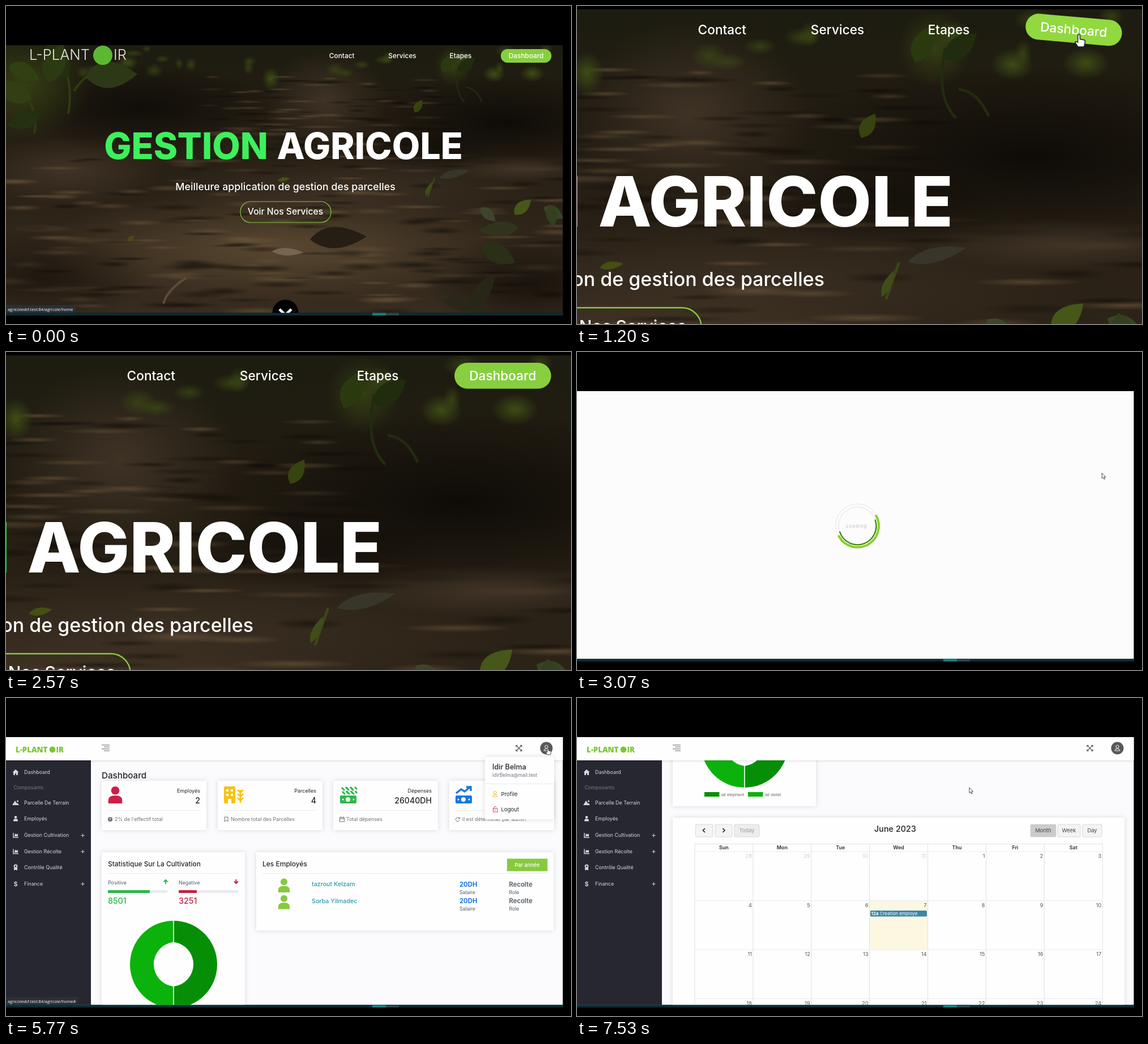
Recreate the animation shown at these times as an HTML page. Size 998 by 561 pixels, loop 7.56 s.

```html
<!DOCTYPE html>
<html lang="fr">
<head>
<meta charset="utf-8">
<title>Gestion agricole</title>
<style>
  html, body { margin: 0; width: 100%; height: 100%; overflow: hidden; background: #000; }
  svg { display: block; width: 100%; height: 100%; font-family: Inter, "Open Sans", sans-serif; }
  .card { fill: #fefefe; filter: drop-shadow(0 0 4px #0002); }
</style>
</head>
<body>
<svg id="stage" viewBox="0 0 998 561"></svg>
<script>
const LOOP = 7560, SCROLL = 389;
const GREEN = '#86ca3e', INK = '#222429', MUTED = '#6c727a';

// Markup helpers
const text = (x, y, s, size, fill = INK, weight = 400, more = '') =>
  `<text x="${x}" y="${y}" font-size="${size}" fill="${fill}" font-weight="${weight}" ${more}>${s}</text>`;
const END = 'text-anchor="end"', MID = 'text-anchor="middle"';
const rect = (x, y, w, h, fill, more = '') =>
  `<rect x="${x}" y="${y}" width="${w}" height="${h}" fill="${fill}" ${more}/>`;
const circle = (x, y, r, fill, more = '') => `<circle cx="${x}" cy="${y}" r="${r}" fill="${fill}" ${more}/>`;
const line = (d, stroke, width = 1, more = '') =>
  `<path d="${d}" fill="none" stroke="${stroke}" stroke-width="${width}" ${more}/>`;
const shape = (d, fill, more = '') => `<path d="${d}" fill="${fill}" ${more}/>`;
const at = (x, y, s, k = 1) => `<g transform="translate(${x} ${y}) scale(${k})">${s}</g>`;
const card = (x, y, w, h) => rect(x, y, w, h, '#fefefe', 'class="card"');
const rule = (x1, x2, y) => line(`M${x1} ${y}H${x2}`, '#e8eaed');

let seed = 11;
const rand = () => (seed = (seed * 16807) % 2147483647) / 2147483647;

// Field backdrop
function field() {
  const tones = { pale: '#6b563b', earth: '#46382a', dark: '#0d0a06', moss: '#3d4c14' };
  const defs = Object.entries(tones).map(([id, c]) =>
    `<radialGradient id="${id}"><stop stop-color="${c}"/><stop offset="1" stop-color="${c}" stop-opacity="0"/></radialGradient>`).join('');
  const blob = (id, x, y, rx, ry, o = 1) =>
    `<ellipse cx="${x}" cy="${y}" rx="${rx}" ry="${ry}" fill="url(#${id})" opacity="${o}"/>`;
  const leaf = (x, y, len, angle, fill, wide = .34) =>
    `<path transform="translate(${x} ${y}) rotate(${angle})" fill="${fill}" d="M0 0Q${len * .35} ${-len * wide * 1.6} ${len} 0Q${len * .4} ${len * wide * 1.4} 0 0"/>`;
  let out = `<defs>${defs}<linearGradient id="soil" x2="0" y2="1">
    <stop stop-color="#1d1c10"/><stop offset=".2" stop-color="#221c12"/>
    <stop offset=".55" stop-color="#2b2217"/><stop offset="1" stop-color="#382c1f"/></linearGradient></defs>`;
  out += rect(0, 69, 984, 473, 'url(#soil)');
  out += blob('earth', 565, 165, 110, 85, .8) + blob('pale', 480, 425, 420, 100, .7) + blob('earth', 600, 325, 330, 60, .6);
  out += blob('earth', 110, 290, 170, 60, .8);

  // Furrows: wide thin streaks that thicken towards the viewer
  for (let i = 0; i < 260; i++) {
    const d = rand(), y = 125 + d * 415, r = 9 + rand() * 20 + d * 14;
    const x = d < .35 ? 570 + (rand() - .5) * 440 : rand() * 984;
    out += blob(i % 2 ? 'dark' : 'pale', x, y, r * 1.7, 2.5 + d * 7 * rand(), .35 + .3 * rand());
  }
  out += blob('dark', 880, 205, 250, 85, .95) + blob('dark', 240, 180, 230, 80, .85) + blob('dark', 735, 250, 130, 36, .7);
  out += blob('dark', 930, 490, 190, 90, .7) + blob('dark', 60, 480, 200, 85, .55) + blob('earth', 905, 287, 130, 24, .8);

  for (let i = 0; i < 24; i++) out += blob('moss', rand() * 984, 74 + rand() * 45, 7 + rand() * 14, 6 + rand() * 10, .7);
  out += blob('moss', 790, 105, 34, 36, .7) + blob('moss', 862, 120, 20, 15) + blob('moss', 930, 119, 22, 15) + blob('moss', 468, 128, 16, 20);
  out += blob('moss', 30, 140, 120, 95, .7);
  out += line('M110 190Q120 130 95 95M50 225Q60 170 10 140M120 150Q140 120 160 118', '#303b10', 4);
  out += leaf(140, 125, 92, -3, '#2d3816') + leaf(110, 125, 75, -120, '#232f0f') + leaf(45, 165, 70, 205, '#313f12');
  out += leaf(75, 135, 75, -70, '#2b3a12') + leaf(60, 190, 62, 160, '#252f11') + leaf(5, 105, 60, 25, '#304111');
  out += line('M800 105Q790 150 810 170M812 143Q830 145 840 168', '#232b0f', 2.5);
  out += leaf(772, 118, 38, -65, '#2b390f') + leaf(800, 116, 38, -40, '#202c0d') + leaf(722, 188, 26, -60, '#37440f');
  out += line('M745 337L757 303', '#3c4618', 2.5) + leaf(765, 303, 56, -14, '#38362a', .16);
  out += leaf(741, 335, 27, -65, '#414d18', .18) + leaf(898, 368, 40, -42, '#465719') + leaf(838, 356, 36, 42, '#3f442a');
  out += leaf(905, 390, 70, 175, '#31341d', .25) + leaf(950, 355, 40, 30, '#384422') + leaf(960, 350, 40, 80, '#343e20');
  out += leaf(840, 425, 66, 25, '#2a2f18') + leaf(770, 520, 90, 8, '#29271a', .2) + leaf(820, 535, 75, -55, '#282717', .25);
  out += leaf(537, 412, 100, -3, '#261d14', .25) + leaf(480, 308, 22, -10, '#454f13', .22) + leaf(215, 415, 16, -40, '#4a4915');
  return out + leaf(470, 433, 56, 2, '#74664f', .16) + line('M278 525Q285 500 318 480', '#5c4c38', 4);
}

function hero() {
  const nav = [[593.2, 'Contact'], [700, 'Services'], [803, 'Etapes']]
    .map(([x, s]) => text(x, 92, s, 11.9, '#fff', 500, MID)).join('');
  return field() + text(41, 95, 'L-PLANT', 25.5, '#e9e8e4', 300) + circle(171, 87, 17, '#5cb832')
    + text(190, 95, 'IR', 25.5, '#e9e8e4', 300) + nav
    + `<g id="pill">${rect(874, 76, 89.5, 24, GREEN, 'id="pillBox" rx="12"')}${text(918.7, 92, 'Dashboard', 11.9, '#fff', 500, MID)}</g>`
    + text(463, 270, 'GESTION', 64.2, '#3df05c', 800, END) + text(478.5, 270, 'AGRICOLE', 64.2, '#fff', 800)
    + text(493.5, 325, 'Meilleure application de gestion des parcelles', 17.8, '#fff', 500, MID)
    + rect(414, 345, 160, 37, 'none', `rx="18" stroke="${GREEN}" stroke-width="1.2"`)
    + text(493.5, 368, 'Voir Nos Services', 15.7, '#fff', 500, MID)
    + circle(493.5, 541, 23, '#000') + line('M483 535L493.5 545L504 535', '#fff', 4.5);
}

function loader() {
  const arc = (id, r, color, w) => `<g id="${id}">${line(`M${r} 0A${r} ${r} 0 0 1 ${-r} 0`, color, w, 'stroke-linecap="round"')}</g>`;
  const ring = r => circle(0, 0, r, 'none', 'stroke="#e3e3e6" stroke-width="1"');
  return rect(0, 69, 984, 473, '#fcfcfd') + at(495.5, 307, ring(39) + ring(33.5) + arc('outer', 37.5, '#86d12a', 4) + arc('inner', 33, '#4c8a12', 2.4)
    + text(-20, 2.7, 'Loading<tspan opacity=".4">.</tspan>', 7.4, '#b9b9c2', 400, 'letter-spacing="1.3"'));
}

// Icons, each centred on its own origin
const person = c => circle(0, -5, 4.2, c) + shape('M-7 8V5Q-7 0 0 0T7 5V8Z', c);
const banknote = c => rect(-14, 1, 29, 14, c, 'rx="2"') + circle(0, 8, 4, '#fff') + circle(-9, 8, 1.5, '#fff') + circle(10, 8, 1.5, '#fff');
const sprig = c => [-11, -3, 5].map(x => line(`M${x} -13l5 5M${x + 1} -6l5 5M${x + 7} -14l4 4M${x + 8} -7l3 4`, c, 3)).join('');
const wheat = c => line('M0 14V-9M-5 -9l5 5l5 -5M-5 -2l5 5l5 -5M-5 5l5 5l5 -5', c, 2.6);
const building = c => rect(-18, -15, 20, 30, c, 'rx="2"')
  + [-14, -6].map(x => [-10, -2].map(y => rect(x, y, 4, 4, '#fff')).join('')).join('') + rect(-11, 7, 6, 8, '#fff') + at(11, 0, wheat(c));
const trend = c => line('M-13 -3L-4 -10L2 -6L12 -14M5 -14H13V-7', c, 3.4) + banknote(c);
const burger = line('M-7 -5H7M-3 -1.7H7M-7 1.7H7M-3 5H7', '#666', 1.1);
const expand = line('M-5 -5L5 5M5 -5L-5 5M-5 -2V-5H-2M2 -5H5V-2M5 2V5H2M-2 5H-5V2', '#555', 1.1);
const outlinePerson = c => circle(0, -2, 2.6, 'none', `stroke="${c}"`) + line('M-4.5 5Q-4 1.5 0 1.5T4.5 5Z', c);
const chart = c => line('M-4 -4V4H5', c, 1.5) + shape('M-2 2V0L0 -3L2 -1L4 -3V2Z', c);

function sidebar() {
  const c = '#d6d7dd';
  const items = [
    [131, 'Dashboard', shape('M-5.5 0L0 -5L5.5 0H4V5H1V2H-1V5H-4V0Z', c)],
    [185, 'Parcelle De Terrain', shape('M-6 4L-1 -4L2 1L3 0L6 4Z', c) + circle(3.5, -3, 1.5, c)],
    [213, 'Employés', at(0, 0, person(c), .55)],
    [242, 'Gestion Cultivation', chart(c), 1],
    [270.5, 'Gestion Récolte', chart(c), 1],
    [299, 'Contrôle Qualité', circle(0, -2, 2.4, 'none', `stroke="${c}" stroke-width="2"`) + shape('M-3 1L-3 5L0 4L3 5L3 1Z', c)],
    [327.5, 'Finance', text(0, 4, '$', 11, c, 600, MID), 1],
  ];
  return rect(0, 110, 150, 432, '#272732') + text(13.5, 161, 'Composants', 8.9, '#797a83')
    + items.map(([y, s, icon, more]) => at(17, y, icon) + text(32, y + 3.3, s, 8.9, c)
      + (more ? line(`M132.5 ${y + .5}h6M135.5 ${y - 2.5}v6`, c) : '')).join('');
}

function cards() {
  const list = [
    [169, 'Employés', '2', "2% de l'effectif total", at(24, 26, person('#cb1f47'), 1.75), circle(15, 68, 4, MUTED) + rect(14.4, 65.5, 1.2, 3.4, '#fff')],
    [374, 'Parcelles', '4', 'Nombre total des Parcelles', at(29, 25, building('#f7c313')), line('M12 64H18V72L15 69.5L12 72Z', MUTED)],
    [578, 'Dépenses', '26040DH', 'Total dépenses', at(26, 25, sprig('#2fb84c') + banknote('#2fb84c')), rect(11.5, 65, 8, 7, 'none', `stroke="${MUTED}"`) + line('M11 67H20M13.5 63v2M17.5 63v2', MUTED)],
    [783, '', '', 'il est déterminer par admin', at(25, 25, trend('#1877e0')), line('M18 66.5A3.5 3.5 0 1 0 18 70M18.5 64V67H15.5', MUTED)],
  ];
  return list.map(([x, label, value, note, icon, mark]) => at(x, 146, card(0, 0, 185, 87) + icon
    + text(174, 21, label, 9, INK, 400, END) + text(174, 40, value, 14.1, INK, 500, END)
    + rule(11, 174, 52.5) + mark + text(23, 71, note, 8.9, MUTED))).join('');
}

function stats() {
  const meter = (x, label, value, color, width, arrow) => text(x, 329, label, 8.9, '#555b63')
    + line(arrow, color, 2) + rect(x, 339, 105.5, 5, '#e9ebee', 'rx="1"') + rect(x, 339, width, 5, color, 'rx="1"') + text(x, 363, value, 14.3, color, 500);
  const half = (sweep, fill) => shape(`M296 393A77 77 0 0 ${sweep} 296 547V509A39.5 39.5 0 0 ${1 - sweep} 296 430.5Z`, fill);
  const legend = (x, s, fill) => rect(x, 555, 26.5, 8, fill) + text(x + 30, 562, s, 7.8, '#666', 400, 'font-family="Liberation Sans, sans-serif"');
  return card(169, 272, 253, 308) + text(180, 296.5, 'Statistique Sur La Cultivation', 11.9, INK, 500) + rule(180, 411, 309.5)
    + meter(180, 'Positive', '8501', '#2db84b', 74, 'M282 328V321M278.5 324.5L282 321L285.5 324.5')
    + meter(305, 'Negative', '3251', '#c91f45', 32, 'M406.5 320V327M403 323.5L406.5 327L410 323.5')
    + half(0, '#0bb20b') + half(1, '#068f06') + line('M296 393V431M296 509V547', '#fff', 1.6)
    + legend(225, 'ail elephant', '#068f06') + legend(302, 'ail violet', '#0bb20b');
}

function staff() {
  const row = (y, name) => at(491, y + .5, person(GREEN), 1.45) + text(540, y + 1, name, 10.7, '#2c98ab', 500)
    + text(801, y + 1.5, '20DH', 11.3, '#1877e0', 700) + text(801, y + 14.5, 'Salaire', 8.7, '#555b63')
    + text(888.5, y + 1.5, 'Recolte', 11.3, '#626972', 700) + text(888.5, y + 14.5, 'Role', 8.7, '#555b63');
  return card(442, 272, 525, 138) + text(453, 296.5, 'Les Employés', 12, INK, 500) + rule(453, 956, 309.5)
    + rect(885, 283.5, 71.5, 22, GREEN) + text(920.5, 297.5, 'Par année', 9.2, '#fff', 500, MID)
    + row(331, 'tazrout Kelzam') + row(360.5, 'Sorba Yilmadec');
}

function calendar() {
  const x0 = 208, y0 = 271, w = 102.9, h = 86.5, edge = '#dfe1e4';
  const button = (x, width, s, fill = '#f4f4f4', color = '#444') => rect(x, 223, width, 22, fill, 'rx="2" stroke="#d0d0d0" stroke-width=".8"')
    + text(x + width / 2, 237, s, 9.4, color, 400, MID);
  let out = card(169, 211, 798, 520) + button(209.5, 30.5, '') + button(244, 30, '') + line('M226 230L222.5 233.5L226 237M257.5 230L261 233.5L257.5 237', '#222', 1.7)
    + button(278, 44, 'Today', '#ededee', '#999') + text(562, 236, 'June 2023', 14.4, INK, 500, MID)
    + button(801, 45, 'Month', '#cbcbcc') + button(849, 40, 'Week') + button(893, 34, 'Day')
    + rect(x0 + 3 * w, y0 + h, w, h, '#fcf7e1');
  ['Sun', 'Mon', 'Tue', 'Wed', 'Thu', 'Fri', 'Sat'].forEach((s, i) => out += text(x0 + w * (i + .5), 267, s, 8.9, '#444', 700, MID));
  for (let i = 0; i < 28; i++) {
    const col = i % 7, row = Math.floor(i / 7), old = i < 4;
    out += text(x0 + w * (col + 1) - 2, y0 + row * h + 11, old ? 28 + i : i - 3, 9.2, old ? '#cfcfd2' : '#555', 400, END);
  }
  for (let i = 0; i < 8; i++) out += line(`M${x0 + i * w} 257V640`, edge);
  for (let i = 0; i < 5; i++) out += rule(x0, x0 + 7 * w, y0 + i * h);
  return out + line(`M${x0} 257.5H${x0 + 7 * w}`, edge) + rect(518, 375, 100, 10.5, '#3a87ad', 'rx="1.5"')
    + text(519.5, 383, '<tspan font-weight="700">12a</tspan> Creation employe', 8, '#fff');
}

function menu() {
  return card(846, 104, 122, 110) + text(859, 126, 'Idir Belma', 12.6, INK, 500) + text(859, 139, 'idirBelma@mail.test', 8.5, MUTED)
    + rule(846, 968, 151.5) + at(864, 169, outlinePerson('#efc02c')) + text(874.5, 173, 'Profile', 9.6)
    + rect(860.5, 195, 7.5, 6, 'none', 'stroke="#d63a78"') + line('M862 195V192.5Q864 190 866.5 192.5M864 197v2', '#d63a78') + text(874.5, 199.5, 'Logout', 9.6);
}

function dashboard() {
  return rect(0, 69, 984, 473, '#fbfbfd') + `<g id="content">${cards()}${text(169, 142, 'Dashboard', 15.2, INK, 500)}${stats()}${staff()}${at(0, SCROLL, calendar())}</g>`
    + sidebar() + rect(0, 69, 984, 41, '#fefefe', 'style="filter:drop-shadow(0 1px 2px #0002)"')
    + `<g font-family="Open Sans, sans-serif">${text(17, 95.5, 'L-PLANT', 13.2, '#79c72f', 800)}${text(88.5, 95.5, 'IR', 13.2, '#79c72f', 800)}</g>` + circle(82, 91, 5.4, '#79c72f')
    + at(176, 88, burger) + at(906, 88.5, expand) + circle(954.5, 88.5, 11, '#58585c') + at(954.5, 88, outlinePerson('#fff'))
    + `<g id="menu">${menu()}</g>`;
}

const arrow = shape('M0 0V9.5L2.2 7.6L3.8 11L5.3 10.3L3.8 7H6.6Z', '#fff', 'stroke="#23232b" stroke-width=".8"');
const hand = shape('M-1 .8Q0 -.8 1 .8V4.3L5 5.2Q6 5.6 5.7 7L4.8 11.5H-.8L-3.6 7.3Q-3.5 5.9 -1 7.3Z', '#fff', 'stroke="#23232b" stroke-width=".8"');

document.getElementById('stage').innerHTML = `<defs><clipPath id="page"><path d="M0 69H983.5V541.5H0Z"/></clipPath></defs>
  <g id="view"><g clip-path="url(#page)"><g id="hero">${hero()}</g><g id="loader">${loader()}</g><g id="dash">${dashboard()}</g>
  <g id="status" font-family="Open Sans, sans-serif">${rect(0, 528, 123, 14, '#2a3036', 'id="statusBox"')}<text id="url" x="3" y="537.5" font-size="7.4" fill="#fff"></text></g></g>
  ${rect(0, 541.5, 984, 4.5, '#0b2c34')}${rect(647, 541.5, 24, 4.5, '#128080')}${rect(671, 541.5, 23, 4.5, '#28474b')}
  <g id="cursor"><g id="arrow">${arrow}</g><g id="hand">${hand}</g></g></g>`;

const $ = Object.fromEntries([...document.querySelectorAll('g[id], #pillBox, #statusBox, #url')].map(e => [e.id, e]));
const set = (e, transform) => e.setAttribute('transform', transform);
const show = (e, on) => e.setAttribute('display', on ? 'inline' : 'none');
const ease = (t, from, to) => { const p = Math.min(1, Math.max(0, (t - from) / (to - from))); return p * p * (3 - 2 * p); };
const track = (keys, t, i) => keys.reduce((v, k, n) => n ? v + (k[i] - keys[n - 1][i]) * ease(t, keys[n - 1][0], k[0]) : k[i], 0);

const SWING = [[600, 0], [800, 15], [1000, -10], [1200, 5], [1400, -5], [1600, 0]];
const PATH = [[350, 940, 170], [600, 923.5, 92.3], [1500, 923.5, 92.3], [1600, 923, 89.5], [2500, 923, 89.5],
  [2950, 927.3, 213.5], [5390, 927.3, 213.5], [5650, 957, 88.5], [6830, 957, 88.5], [7000, 693, 158]];

function draw(t) {
  const zoom = ease(t, 780, 1180) - ease(t, 2610, 3040);
  set($.view, `translate(${-875.5 * zoom} ${-126 * zoom}) scale(${1 + .908 * zoom})`);

  show($.hero, t < 2800);
  show($.loader, t >= 2800 && t < 5400);
  show($.dash, t >= 5400);
  set($.pill, `rotate(${track(SWING, t, 1)} 918.5 88)`);
  $.pillBox.setAttribute('fill', t > 600 && t < 2400 ? '#92d83f' : '#87cf3f');
  set($.outer, `rotate(${72 + (t - 4470) * .072})`);
  set($.inner, `rotate(${32 + (t - 4470) * .036})`);

  const onAvatar = t >= 5640 && t < 6860;
  show($.menu, t >= 5700 && t < 6860);
  set($.content, `translate(0 ${-SCROLL * ease(t, 7300, 7520)})`);
  show($.status, t < 2800 || onAvatar);
  $.url.textContent = 'agricolevbf.test:84/agricole/home' + (onAvatar ? '#' : '');
  $.statusBox.setAttribute('width', onAvatar ? 128 : 123);

  const pointing = (t > 580 && t < 1550) || onAvatar;
  show($.cursor, (t > 350 && t < 2450) || t > 2950);
  show($.hand, pointing);
  show($.arrow, !pointing);
  set($.cursor, `translate(${track(PATH, t, 1)} ${track(PATH, t, 2)})`);
}

const start = performance.now();
(function frame() {
  draw((performance.now() - start) % LOOP);
  requestAnimationFrame(frame);
})();
</script>
</body>
</html>
```
